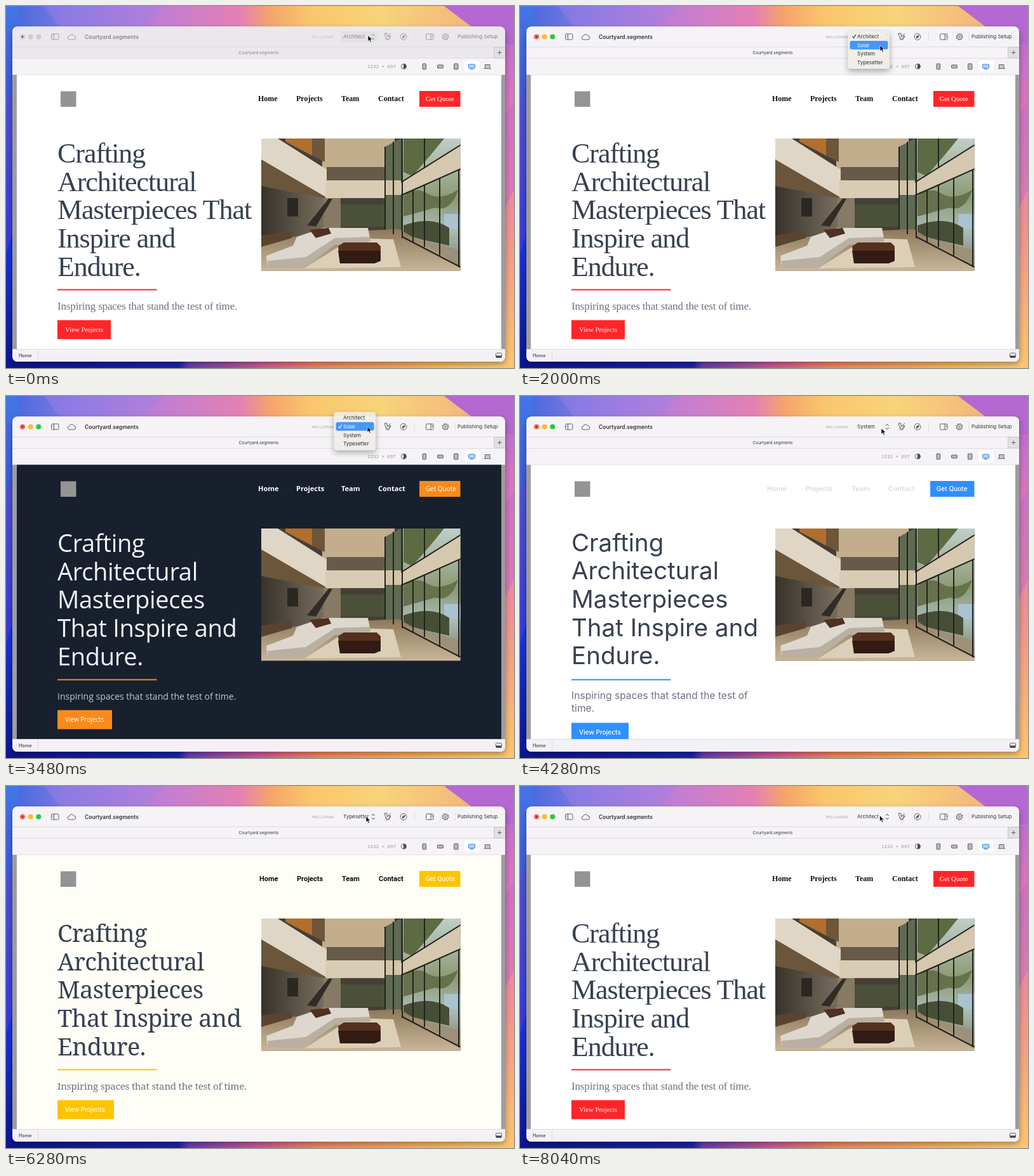
An HTML page that plays this animation: 800 by 571 pixels, repeating every 8.08 s.

```html
<!DOCTYPE html>
<html lang="en">
<head>
<meta charset="utf-8">
<title>Theme switcher</title>
<style>
  html, body { margin: 0; width: 100%; height: 100%; overflow: hidden; }
  svg { display: block; width: 800px; height: 571px; }
  text { font-family: Inter, sans-serif; fill: #333; white-space: pre; }
  .icon { fill: none; stroke: #606064; stroke-width: 1; }
</style>
</head>
<body>
<svg viewBox="0 0 800 571">
  <defs>
    <linearGradient id="top">
      <stop offset="0" stop-color="#3d68de"/><stop offset=".12" stop-color="#7f78e2"/>
      <stop offset=".3" stop-color="#c07dd4"/><stop offset=".46" stop-color="#e480b4"/>
      <stop offset=".52" stop-color="#f5a46c"/><stop offset=".6" stop-color="#fac66c"/>
      <stop offset=".74" stop-color="#f7d47a"/><stop offset="1" stop-color="#f2a77c"/>
    </linearGradient>
    <linearGradient id="left" x2="0" y2="1">
      <stop offset="0" stop-color="#4476e6"/><stop offset=".35" stop-color="#3a4ddd"/>
      <stop offset=".65" stop-color="#1a35e0"/><stop offset="1" stop-color="#0a1690"/>
    </linearGradient>
    <linearGradient id="right" x2="0" y2="1">
      <stop offset="0" stop-color="#b269d6"/><stop offset=".3" stop-color="#e078bd"/>
      <stop offset=".6" stop-color="#ee9292"/><stop offset="1" stop-color="#fdc56c"/>
    </linearGradient>
    <linearGradient id="bottom">
      <stop offset="0" stop-color="#0a1690"/><stop offset=".34" stop-color="#1b22ae"/>
      <stop offset=".36" stop-color="#6a3fb4"/><stop offset=".5" stop-color="#d35a96"/>
      <stop offset=".62" stop-color="#f58a5e"/><stop offset=".85" stop-color="#fdb95c"/>
      <stop offset="1" stop-color="#fdcf7c"/>
    </linearGradient>
    <linearGradient id="floor" x2="0" y2="1">
      <stop offset="0" stop-color="#8d785b"/><stop offset="1" stop-color="#c9b698"/>
    </linearGradient>
    <linearGradient id="wall">
      <stop offset="0" stop-color="#38322a"/><stop offset="1" stop-color="#766d5e"/>
    </linearGradient>
    <linearGradient id="garden" x2="0" y2="1">
      <stop offset="0" stop-color="#bfcfc8"/><stop offset=".45" stop-color="#8c9a74"/>
      <stop offset=".7" stop-color="#a9bcb6"/><stop offset="1" stop-color="#7c7a60"/>
    </linearGradient>
    <filter id="shadow" x="-20%" y="-20%" width="140%" height="150%">
      <feDropShadow dx="0" dy="4" stdDeviation="5" flood-opacity=".35"/>
    </filter>
    <clipPath id="frame"><rect x="10" y="32.5" width="776" height="528.5" rx="8"/></clipPath>
    <clipPath id="sheet"><rect x="17" y="108.5" width="763" height="432.5"/></clipPath>
    <clipPath id="picture"><rect x="402" y="209" width="313.5" height="208.5"/></clipPath>
  </defs>

  <rect width="800" height="571" fill="url(#bottom)"/>
  <rect width="800" height="60" fill="url(#top)"/>
  <rect width="20" height="571" fill="url(#left)"/>
  <rect x="780" width="20" height="571" fill="url(#right)"/>
  <path d="M60 0H250L215 34H85Z" fill="#a07fe4" opacity=".4"/>
  <path d="M690 0H800V60H786L770 34H735Z" fill="#b468d2"/>
  <path d="M0 150L20 110V330L0 390Z" fill="#6246cf" opacity=".4"/>
  <path d="M780 180L800 150V290L780 330Z" fill="#b766cc" opacity=".4"/>

  <rect x="10" y="32.5" width="776" height="528.5" rx="8" fill="#f5f3f6" filter="url(#shadow)"/>
  <g clip-path="url(#frame)">
    <rect id="chrome" x="10" y="32" width="776" height="50.5"/>
    <path d="M10 64.5H786M10 82.5H786" stroke="#dedce0"/>
    <g id="lights">
      <circle cx="26" cy="48.5" r="4"/><circle cx="38.7" cy="48.5" r="4"/><circle cx="51.3" cy="48.5" r="4"/>
    </g>
    <circle cx="26" cy="48.5" r="1.3" fill="#70201c"/>

    <g id="tools">
      <g class="icon">
        <rect x="71.5" y="44" width="11.5" height="9" rx="1.5"/><path d="M75.5 44v9M73 46.5h1M73 48.5h1"/>
        <path d="M100 53a2.7 2.7 0 0 1-.3-5.4 3.7 3.7 0 0 1 7-.6 3 3 0 0 1 .2 6Z"/>
        <path d="M596 43h4v4h6l-3 6h-4ZM598 51l8-8M600 53l6-6"/>
        <circle cx="626" cy="48.5" r="5"/><path d="M624 51l1-3.5 3.4-1.4-1.2 3.4Z" fill="#606064"/>
        <rect x="661.5" y="44" width="11.5" height="9" rx="1.5"/><path d="M669 44v9M670.5 46.5h1.5M670.5 48.5h1.5"/>
        <circle cx="692" cy="48.5" r="4"/><circle cx="692" cy="48.5" r="1.6"/>
        <circle cx="692" cy="48.5" r="5" stroke-dasharray="1.9 2" stroke-width="1.2"/>
        <path d="M643.5 42v13M707 42v13" stroke="#dddbdf"/>
      </g>
      <text x="124" y="51.8" font-size="8.5" font-weight="600">Courtyard.segments</text>
      <text x="481.5" y="50.8" font-size="5.4" style="fill:#a5a3a8">PRO LICENSE</text>
      <rect id="hover" x="527" y="40" width="59" height="17" rx="4" fill="#dfdde1"/>
      <text id="choice" x="531" y="51.2" font-size="8"></text>
      <path class="icon" d="M576 46.8l2.3-2.5 2.3 2.5M576 50.2l2.3 2.5 2.3-2.5" style="stroke:#333"/>
      <text x="711" y="51.3" font-size="8">Publishing Setup</text>
      <text x="398" y="75.8" font-size="6.5" text-anchor="middle">Courtyard.segments</text>
    </g>
    <rect x="768.5" y="65" width="18" height="17" fill="#e2e0e4" stroke="#c9c7cb"/>
    <path class="icon" d="M774 73.5h6.4M777.2 70.3v6.4"/>

    <text x="569" y="97.7" font-size="7.5" style="font-family:'Noto Sans Mono',monospace;fill:#98969b">1232 × 697</text>
    <g class="icon">
      <circle cx="626.3" cy="95.3" r="4"/><path d="M626.3 91.3a4 4 0 0 1 0 8Z" fill="#444"/>
      <rect x="656" y="91" width="5.5" height="9" rx="1" fill="#b8b6bb"/>
      <rect x="679.5" y="93" width="9" height="5" rx="1" fill="#b8b6bb"/>
      <rect x="705.5" y="91" width="6.5" height="9" rx="1" fill="#b8b6bb"/>
      <rect x="722" y="86" width="23.5" height="18" rx="4" fill="#fff" stroke="none"/>
      <rect x="728.5" y="92" width="10" height="6" rx="1" fill="#b5d6ff" style="stroke:#2f80ed"/>
      <path d="M731 99.5h5" style="stroke:#2f80ed"/>
      <path d="M754.5 98v-5.5h7.5V98M752.5 98.7h11.5" fill="#c8c6ca"/>
    </g>

    <rect x="10" y="108.5" width="776" height="433" fill="#9d9c9f"/>
    <g clip-path="url(#sheet)">
      <g id="page"></g>
      <rect x="86" y="134.5" width="24.5" height="24.5" fill="#949494"/>
      <g id="photo" clip-path="url(#picture)"></g>
    </g>
    <rect x="10" y="541" width="776" height="20" fill="#f3f1f5"/>
    <path d="M10 541.5H786M50.5 542V558" stroke="#dcdade"/>
    <text x="20" y="553.8" font-size="7.2" font-weight="600" style="fill:#555">Home</text>
    <rect class="icon" x="771.5" y="547.5" width="9" height="7" rx="1"/>
    <path d="M772 551.5h8v3h-8Z" fill="#444"/>
  </g>

  <g id="menu"></g>
  <path id="cursor" d="M0 0V9.2L2.2 7.2L3.8 10.7L5.4 10L3.9 6.6H6.8Z" fill="#000" stroke="#fff" stroke-width=".7"/>
</svg>

<script>
const LOOP = 8080;
const $ = id => document.getElementById(id);
const rect = (x, y, w, h, fill, rx = 0) =>
  `<rect x="${x}" y="${y}" width="${w}" height="${h}" rx="${rx}" fill="${fill}"/>`;
const text = (x, y, size, fill, label, font = 'Inter,sans-serif', weight = 400, gap = 0) =>
  `<text x="${x}" y="${y}" font-size="${size}" font-weight="${weight}" letter-spacing="${gap}"
    style="fill:${fill};font-family:${font}">${label}</text>`;

const SERIF = "'Liberation Serif',serif", SLAB = "'Noto Serif',serif",
      INTER = 'Inter,sans-serif', ROBOTO = 'Roboto,sans-serif', OPEN = "'Open Sans',sans-serif";
const wideLines = ['Crafting', 'Architectural', 'Masterpieces', 'That Inspire and', 'Endure.'];
const tagline = ['Inspiring spaces that stand the test of time.'];

const themes = [
  { name: 'Architect', bg: '#fff', accent: '#ff2528', ink: '#374151', soft: '#6b7280', nav: 17,
    lines: ['Crafting', 'Architectural', 'Masterpieces That', 'Inspire and', 'Endure.'],
    head: [SERIF, 44, -1.05, 247], sub: [SERIF, 17, -.15], tagline,
    menu: [SERIF, 12, 700], links: [397, 457, 528, 586], label: [SERIF, 10.8, 400], quote: 651, view: 84 },
  { name: 'Solar', bg: '#18202e', accent: '#f98a1c', ink: '#f3f4f6', soft: '#c3c8d0', nav: 255,
    lines: wideLines, head: [OPEN, 38, -.3, 246], sub: [OPEN, 14, 0], tagline,
    menu: [OPEN, 11, 700], links: [397, 457, 528, 586], label: [OPEN, 10, 500], quote: 651, view: 86 },
  { name: 'System', bg: '#fff', accent: '#2f8fff', ink: '#374151', soft: '#6b7280', nav: 10,
    lines: wideLines, head: [INTER, 38.5, 0, 244.5], sub: [INTER, 15.6, 0],
    tagline: ['Inspiring spaces that stand the test of', 'time.'],
    menu: [INTER, 10.8, 600], links: [389, 449, 522, 580], label: [INTER, 10.1, 500], quote: 646, view: 90 },
  { name: 'Typesetter', bg: '#fefef6', accent: '#ffc400', ink: '#374151', soft: '#6b7280', nav: 10,
    lines: wideLines, head: [SLAB, 38, -.7, 246], sub: [SLAB, 15, -.18], tagline,
    menu: [ROBOTO, 11, 700], links: [399, 458, 529, 587], label: [ROBOTO, 10.3, 400], quote: 651, view: 89 }
];

const pageMarkup = t => {
  const [font, size, gap, base] = t.head, [subFont, subSize, subGap] = t.sub;
  const [navFont, navSize, navWeight] = t.menu, [labelFont, labelSize, labelWeight] = t.label;
  const drop = (t.tagline.length - 1) * 20;
  return rect(17, 108, 763, 434, t.bg) +
    '<g id="nav">' + ['Home', 'Projects', 'Team', 'Contact'].map((label, i) =>
      text(t.links[i], 150.3, navSize, 'inherit', label, navFont, navWeight)).join('') + '</g>' +
    rect(t.quote, 134, 715.5 - t.quote, 25, t.accent) +
    text(t.quote + 9.8, 150, labelSize, '#fff', 'Get Quote', labelFont, labelWeight) +
    t.lines.map((line, i) => text(81, base + i * 44.7, size, t.ink, line, font, 400, gap)).join('') +
    rect(81, 446.5, 156.5, 2, t.accent) +
    t.tagline.map((line, i) => text(81, 479 + i * 20 - drop / 20, subSize, t.soft, line, subFont, 400, subGap)).join('') +
    rect(81, 495.5 + drop, t.view, 30, t.accent) +
    text(93, 514 + drop, labelSize, '#fff', 'View Projects', labelFont, labelWeight);
};

// Interior scene in flat shapes: fill, path
$('photo').innerHTML = [
  ['#463f36', 'M402 209H716V418H402Z'],
  ['#c2ae8d', 'M498 209H612V278H498Z'],
  ['#665a49', 'M505 254H597V275H505Z'],
  ['#b06f2c', 'M440 209H482V236L440 214Z'],
  ['#6f5539', 'M482 209H502V246L482 236Z'],
  ['#6b563c', 'M402 240L505 300V312L402 284Z'],
  ['#e0d6c5', 'M402 209H428L505 258V302L402 242Z'],
  ['url(#wall)', 'M402 284L500 303V364L402 372Z'],
  ['#2b2722', 'M443 303H460V332H443Z'],
  ['#867a65', 'M500 303H527V350H500Z'],
  ['#312c26', 'M474 346L508 304H514L488 348Z'],
  ['#d9ccb5', 'M503 275H620V303H503Z'],
  ['#4b5138', 'M527 313H600V348H527Z'],
  ['#5f6a52', 'M597 222L622 209V366L597 352Z'],
  ['#d2c3a8', 'M597 275H622V298H597Z'],
  ['url(#garden)', 'M624 209H716V418L624 366Z'],
  ['#5c6b42', 'M626 209H690L668 236L640 268L626 262Z'],
  ['#66724c', 'M626 300Q645 284 664 296T712 290Q700 326 676 318L626 332Z'],
  ['#a9c3d0', 'M690 328H716V352H690Z'],
  ['#464f35', 'M626 346Q670 330 698 350V378L626 362Z'],
  ['#9d9078', 'M626 360L716 386V412Z'],
  ['#d6c7af', 'M614 284L716 219V256L622 297Z'],
  ['url(#floor)', 'M402 372L500 357L620 352L716 412V418H402Z'],
  ['#dccfb8', 'M470 414L545 366L610 368L622 412Z'],
  ['#5a4430', 'M402 362L450 355V366L402 380Z'],
  ['#ddd7cd', 'M410 394L452 378L458 364L500 350H570L574 371L518 376L470 410L412 414Z'],
  ['#b9b0a3', 'M412 402L472 396L518 366L573 364L574 372L518 377L470 411L412 414Z'],
  ['#4f3022', 'M478 353L508 350L512 359L488 366Z'],
  ['#55301f', 'M523 379L532 373H584L590 379V402L580 406H526Z'],
  ['#321b13', 'M523 386H590V402L580 406H526Z']
].map(([fill, d]) => `<path fill="${fill}" d="${d}"/>`).join('') +
  `<path d="M624 209V366M659 209V256M641 290V372M659 283V380M683 272V394M713 258V412M597 222V352M610 214V360
    M624 277L716 219M624 298L716 257M624 364L716 412" fill="none" stroke="#24221f" stroke-width="2"/>`;

const selections = [0, 2400, 3950, 5500, 7400];
const pageSwaps = [0, 2800, 4200, 5750, 7600];
const menus = [[450, 2400], [3100, 3950], [4800, 5500], [6500, 7400]];
const cursorPath = [
  [0, 570, 46.5], [450, 570, 46.5], [1000, 568, 46.5], [1500, 568, 46.5], [2000, 567, 62], [2400, 567, 62],
  [2650, 569, 47.5], [3500, 569, 48], [3800, 567, 62], [3950, 567, 62], [4200, 569, 51], [4900, 569, 50],
  [5250, 566, 62], [5500, 566, 62], [5900, 567, 48], [6600, 567, 48], [7100, 567, 9], [7400, 567, 9],
  [7700, 566.5, 46.5], [LOOP, 566.5, 46.5]
];

const ease = u => u < .5 ? 2 * u * u : 1 - 2 * (1 - u) ** 2;
const lastStep = (steps, t) => steps.findLastIndex(s => t >= s);

function cursorAt(t) {
  const i = Math.max(1, cursorPath.findIndex(k => k[0] > t));
  const [t0, x0, y0] = cursorPath[i - 1], [t1, x1, y1] = cursorPath[i];
  const u = ease((t - t0) / (t1 - t0));
  return [x0 + (x1 - x0) * u, y0 + (y1 - y0) * u];
}

function menuMarkup(checked, y) {
  const row = 13.7, first = 48 - checked * row;
  const hovered = Math.round((y - 48) / row) + checked;
  return `<g filter="url(#shadow)" opacity=".88">${rect(516.5, first - 9, 65.5, 60, '#f0eee8', 4)}</g>` +
    themes.map((theme, i) => {
      const mid = first + i * row, fill = i === hovered ? '#fff' : '#2d2d2d';
      return (i === hovered ? rect(519.5, mid - 6.8, 60, 13.6, '#4596f7', 3) : '') +
        text(531, mid + 3, 8, fill, theme.name) +
        (i === checked ? `<path d="M523.5 ${mid}l2 2.5l3.5-5.5" fill="none" stroke="${fill}" stroke-width="1.2"/>` : '');
    }).join('');
}

let shownPage = -1;
function draw(now) {
  const t = now % LOOP, active = t >= 450;
  const step = lastStep(selections, t), choice = step % 4;
  const swap = lastStep(pageSwaps, t), page = swap % 4;
  const [x, y] = cursorAt(t);

  if (page !== shownPage) {
    $('page').innerHTML = pageMarkup(themes[page]);
    shownPage = page;
  }
  const from = themes[swap ? swap - 1 : 0].nav, to = themes[page].nav;
  const shade = from + (to - from) * ease(Math.min(1, (t - pageSwaps[swap]) / 300));
  $('nav').style.fill = `rgb(${shade},${shade},${shade})`;

  const open = menus.some(([a, b]) => t >= a && t < b);
  $('chrome').setAttribute('fill', active ? '#f5f3f6' : '#ebe8ec');
  $('tools').setAttribute('opacity', active ? 1 : .55);
  [...$('lights').children].forEach((dot, i) =>
    dot.setAttribute('fill', active ? ['#fe5f57', '#febc2e', '#28c840'][i] : '#cfcdd1'));
  $('hover').setAttribute('opacity', !active || step && t - selections[step] < 200 ? 1 : 0);
  $('choice').textContent = open ? '' : themes[choice].name;
  $('menu').innerHTML = open ? menuMarkup(choice, y) : '';
  $('cursor').setAttribute('transform', `translate(${x} ${y})`);
}

const start = performance.now();
(function tick() {
  draw(performance.now() - start);
  requestAnimationFrame(tick);
})();
</script>
</body>
</html>
```
